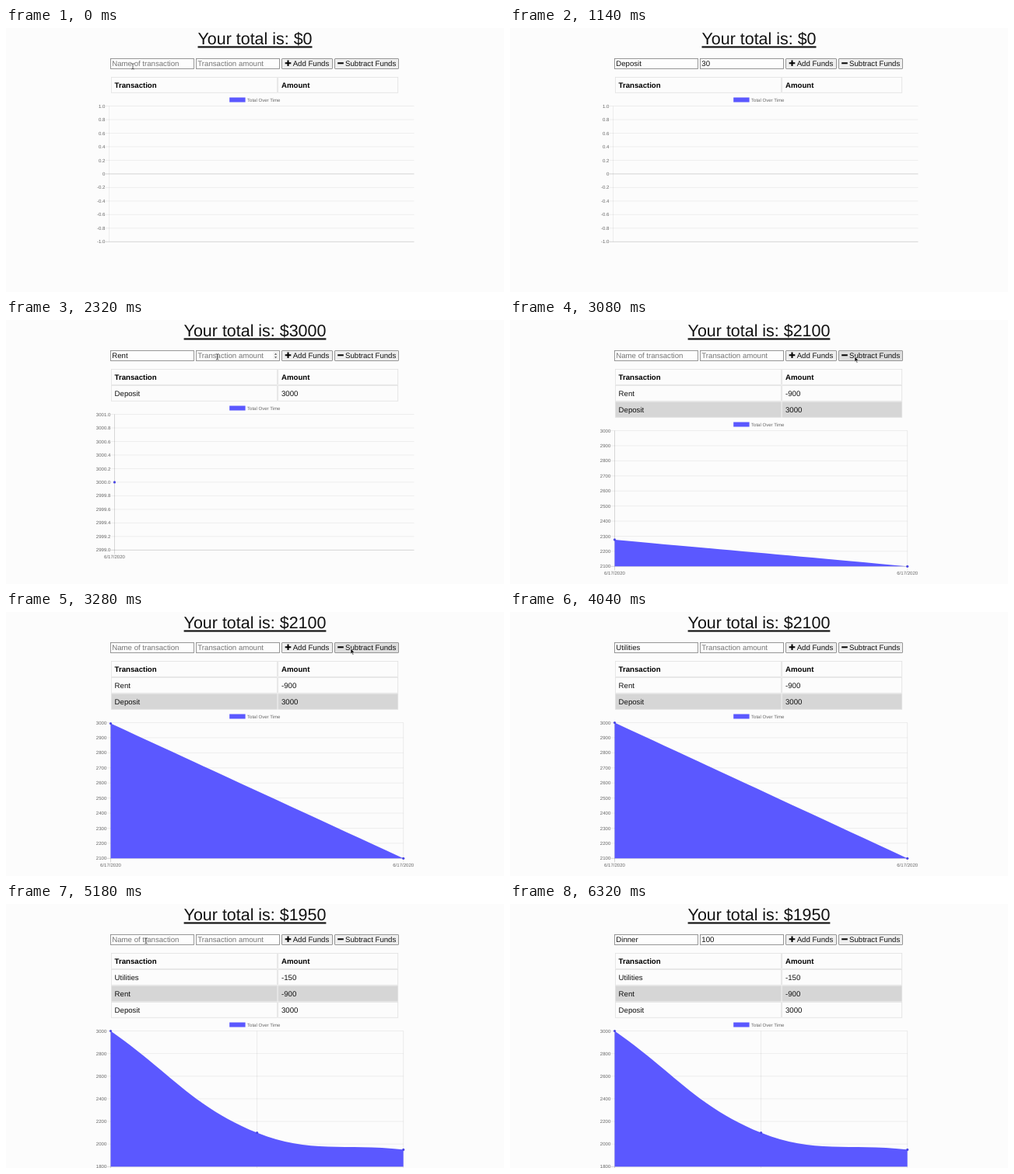
Animation, 640 px wide and 340 px high, one loop 6.34 s. Source, as an HTML page:

```html
<!DOCTYPE html>
<html lang="en">
<head>
<meta charset="utf-8">
<title>Budget tracker</title>
<style>
  html, body { margin: 0; width: 100%; height: 100%; overflow: hidden; background: #fcfcfc; }
  svg { display: block; width: 640px; height: 340px; }
  text { font: 9.65px "Liberation Sans", Arial, sans-serif; fill: #111; text-rendering: geometricPrecision; white-space: pre; }
  .title { font-size: 21.45px; text-decoration: underline; text-anchor: middle; }
  .head { font-weight: bold; fill: #000; }
  .hint { fill: #757575; }
  .small { font-size: 6.05px; fill: #666; }
  .end { text-anchor: end; }
  .mid { text-anchor: middle; }
</style>
</head>
<body>
<svg id="stage" viewBox="0 0 640 340"></svg>
<script>
const LOOP = 6340;
const BLUE = '#5b58ff';
const CHART_TIME = 300;
const ROW = 21;
const PLOT_H = 174.8;
const svg = document.getElementById('stage');
const pen = document.createElement('canvas').getContext('2d');
pen.font = '9.65px "Liberation Sans", Arial, sans-serif';

// Each state holds from its start time; values are the running totals.
const states = [
  { at: 0, rows: [], values: [], min: -1, max: 1, step: 0.2, digits: 1, left: 132.5, right: 524.5 },
  { at: 1580, rows: [['Deposit', 3000]], values: [3000], min: 2999, max: 3001, step: 0.2, digits: 1, left: 139.5, right: 524.5 },
  { at: 3065, rows: [['Rent', -900], ['Deposit', 3000]], values: [3000, 2100], min: 2100, max: 3000, step: 100, digits: 0, left: 134.5, right: 510.7 },
  { at: 4800, rows: [['Utilities', -150], ['Rent', -900], ['Deposit', 3000]], values: [3000, 2100, 1950], min: 1800, max: 3000, step: 200, digits: 0, left: 134.5, right: 510.7 }
];

// Typed entries: text, first key, time per key, time cleared.
const names = [['Deposit', 160, 70, 1580], ['Rent', 2080, 65, 3065], ['Utilities', 3700, 38, 4800], ['Dinner', 5300, 50, LOOP]];
const amounts = [['3000', 1080, 50, 1580], ['900', 2500, 55, 3065], ['150', 4380, 55, 4800], ['100', 6120, 80, LOOP]];

const focus = [[100, 'name'], [960, 'amount'], [1540, ''], [1960, 'name'], [2440, 'amount'], [3040, ''],
  [3560, 'name'], [4300, 'amount'], [4780, ''], [5120, 'name'], [5860, 'amount']];

// Pointer trips: time, x, y. The pointer is hidden between trips.
const trips = [
  [[0, 163, 49], [180, 163, 49]],
  [[740, 170, 50], [850, 225, 56], [940, 262, 48], [1080, 262, 48]],
  [[1260, 264, 48], [1380, 330, 49], [1500, 388, 46], [1640, 388, 46], [1900, 180, 47], [2080, 180, 47]],
  [[2300, 271.5, 47], [2500, 271.5, 47]],
  [[2640, 290, 49], [2860, 443, 47], [3280, 443, 47], [3520, 180, 47], [3700, 180, 47]],
  [[4060, 180, 47], [4260, 280, 48], [4380, 280, 48]],
  [[4520, 290, 49], [4700, 443, 47], [4860, 443, 47], [5060, 180, 47], [5300, 180, 47]],
  [[5620, 180, 47], [5820, 280, 48], [6120, 280, 48]]
];

const fields = {
  name: { x: 134.5, w: 107, hint: 'Name of transaction', entries: names },
  amount: { x: 244.5, w: 107, hint: 'Transaction amount', entries: amounts }
};
const buttons = [
  { x: 354.5, w: 65, label: 'Add Funds', textX: 368.7, icon: 'M358.7 45.3h7.6M362.5 41.5v7.6' },
  { x: 422.5, w: 82, label: 'Subtract Funds', textX: 436, icon: 'M426.2 45.3h7.6' }
];

const last = (list, t) => list.filter(item => t >= (item.at ?? item[0])).pop();
const text = (x, y, str, cls = '') => `<text x="${x}" y="${y}" class="${cls}">${str}</text>`;
const rect = (x, y, w, h, fill, stroke = 'none', width = 1, r = 0) =>
  `<rect x="${x}" y="${y}" width="${w}" height="${h}" rx="${r}" fill="${fill}" stroke="${stroke}" stroke-width="${width}"/>`;
const line = (x1, y1, x2, y2, alpha = 0.1) =>
  `<path d="M${x1} ${y1}L${x2} ${y2}" stroke="#000" stroke-opacity="${alpha}" stroke-width=".6"/>`;
const inside = (p, box) => p && p.x >= box.x && p.x <= box.x + box.w && p.y >= 39 && p.y <= 53;

function pointerAt(t) {
  const trip = trips.find(k => t >= k[0][0] && t < k[k.length - 1][0]);
  if (!trip) return null;
  const i = trip.findIndex(k => k[0] > t);
  const [a, b] = [trip[i - 1], trip[i]];
  const u = (t - a[0]) / (b[0] - a[0]);
  const e = u * u * (3 - 2 * u);
  return { x: a[1] + (b[1] - a[1]) * e, y: a[2] + (b[2] - a[2]) * e };
}

function typedAt(entries, t) {
  const entry = entries.find(e => t >= e[1] && t < e[3]);
  return entry ? entry[0].slice(0, 1 + Math.floor((t - entry[1]) / entry[2])) : '';
}

function drawField(field, t, focused, hovered, spinner) {
  const value = typedAt(field.entries, t);
  const x = field.x + 1.8;
  let out = focused
    ? rect(field.x + 0.2, 39.3, field.w - 0.4, 13.2, '#fff', '#3c62c4', 1.5, 0.8)
    : rect(field.x, 39.5, field.w, 13, '#fdfdfd', '#8c8c8c', 0.9);
  out += text(x, 49.1, value || field.hint, value ? '' : 'hint');
  if (focused && value) out += rect(x + pen.measureText(value).width + 0.2, 41.3, 0.7, 9.6, '#444');
  if (spinner && (focused || hovered)) {
    out += rect(343.5, 41, 6.5, 10, '#f1f1f1') +
      '<path d="M345 44.7l1.6-2 1.6 2zM345 47.3l1.6 2 1.6-2z" fill="#555"/>';
  }
  return out;
}

function drawButton(b, hovered) {
  return rect(b.x, 39.5, b.w, 13, hovered ? '#dedede' : '#efefef', '#8c8c8c', 0.9, 0.5) +
    `<path d="${b.icon}" stroke="#000" stroke-width="2"/>` + text(b.textX, 49.1, b.label);
}

function drawTable(rows) {
  return [['Transaction', 'Amount'], ...rows].map((cells, i) => {
    const y = 63.5 + i * ROW;
    const fill = i > 0 && i % 2 === 0 ? '#d6d6d6' : '#fcfcfc';
    const cls = i ? '' : 'head';
    return rect(135.5, y, 213, 19.8, fill, '#e2e2e2', 0.8) + rect(349.7, y, 154, 19.8, fill, '#e2e2e2', 0.8) +
      text(139.6, y + 13, cells[0], cls) + text(354, y + 13, cells[1], cls);
  }).join('');
}

// Bezier path with handles weighted by the distance to each neighbour.
function curve(points, tension = 0.4) {
  const handles = points.map((p, i) => {
    const a = points[i - 1] || p, b = points[i + 1] || p;
    const before = Math.hypot(p.x - a.x, p.y - a.y), after = Math.hypot(b.x - p.x, b.y - p.y);
    const k = tension / (before + after || 1);
    const shift = d => `${p.x + d * k * (b.x - a.x)} ${p.y + d * k * (b.y - a.y)}`;
    return { back: shift(-before), ahead: shift(after) };
  });
  return points.map((p, i) => i
    ? `C${handles[i - 1].ahead} ${handles[i].back} ${p.x} ${p.y}`
    : `M${p.x} ${p.y}`).join('');
}

function drawChart(s, t) {
  const top = 100.5 + s.rows.length * ROW, bottom = top + PLOT_H;
  const scaleY = v => bottom - (v - s.min) / (s.max - s.min) * PLOT_H;
  const count = Math.round((s.max - s.min) / s.step);
  const slots = Math.max(1, s.values.length - 1);
  const points = s.values.map((v, i) => ({ x: s.left + (s.right - s.left) * i / slots, y: scaleY(v) }));

  let out = rect(287.2, top - 11, 20.4, 6, BLUE) + text(310, top - 5.9, 'Total Over Time', 'small');
  for (let i = 0; i <= count; i++) {
    const v = s.min + i * s.step, y = scaleY(v);
    const zero = Math.abs(v) < 1e-9;
    out += line(s.left - 5, y, s.right, y, zero || !i ? 0.27 : 0.1) +
      text(s.left - 5.2, y + 2.1, zero ? '0' : v.toFixed(s.digits), 'small end');
  }
  if (!points.length) out += line(s.left, top, s.left, bottom);
  points.forEach((p, i) => {
    out += line(p.x, top, p.x, bottom + 5, i ? 0.12 : 0.25) + text(p.x, bottom + 10.5, '6/17/2020', 'small mid');
  });

  const u = Math.min(1, (t - s.at) / CHART_TIME);
  const grow = 1 - (1 - u) ** 4;
  if (points.length > 1) {
    const path = curve(points) + `L${s.right} ${bottom}L${s.left} ${bottom}Z`;
    out += `<path transform="translate(0 ${bottom * (1 - grow)}) scale(1 ${grow})" d="${path}" fill="${BLUE}"/>`;
  }
  points.forEach(p => {
    out += `<circle cx="${p.x}" cy="${bottom + (p.y - bottom) * grow}" r="1.6" fill="#4a47e4"/>`;
  });
  return out;
}

function drawPointer(p) {
  if (!p) return '';
  const beam = Object.values(fields).some(f => inside(p, f));
  const shape = beam
    ? '<path d="M-1.7-3.3Q0-3.3 0-2.3Q0-3.3 1.7-3.3M0-2.3V3M-1.7 4Q0 4 0 3Q0 4 1.7 4" fill="none" stroke="#333" stroke-width=".8"/>'
    : '<path d="M0 0V7L1.6 5.6 2.7 8.2 3.8 7.7 2.7 5.2H4.9Z" fill="#111" stroke="#fff" stroke-width=".5"/>';
  return `<g transform="translate(${p.x} ${p.y})">${shape}</g>`;
}

function render(t) {
  const state = last(states, t);
  const focused = last(focus, t)?.[1];
  const pointer = pointerAt(t);
  const total = state.values[state.values.length - 1] || 0;
  svg.innerHTML = text(320, 21.4, `Your total is: $${total}`, 'title') +
    Object.entries(fields).map(([key, f]) =>
      drawField(f, t, focused === key, inside(pointer, f), key === 'amount')).join('') +
    buttons.map(b => drawButton(b, inside(pointer, b))).join('') +
    drawTable(state.rows) + drawChart(state, t) + drawPointer(pointer);
}

const start = performance.now();
function tick() {
  render((performance.now() - start) % LOOP);
  requestAnimationFrame(tick);
}
tick();
</script>
</body>
</html>
```
